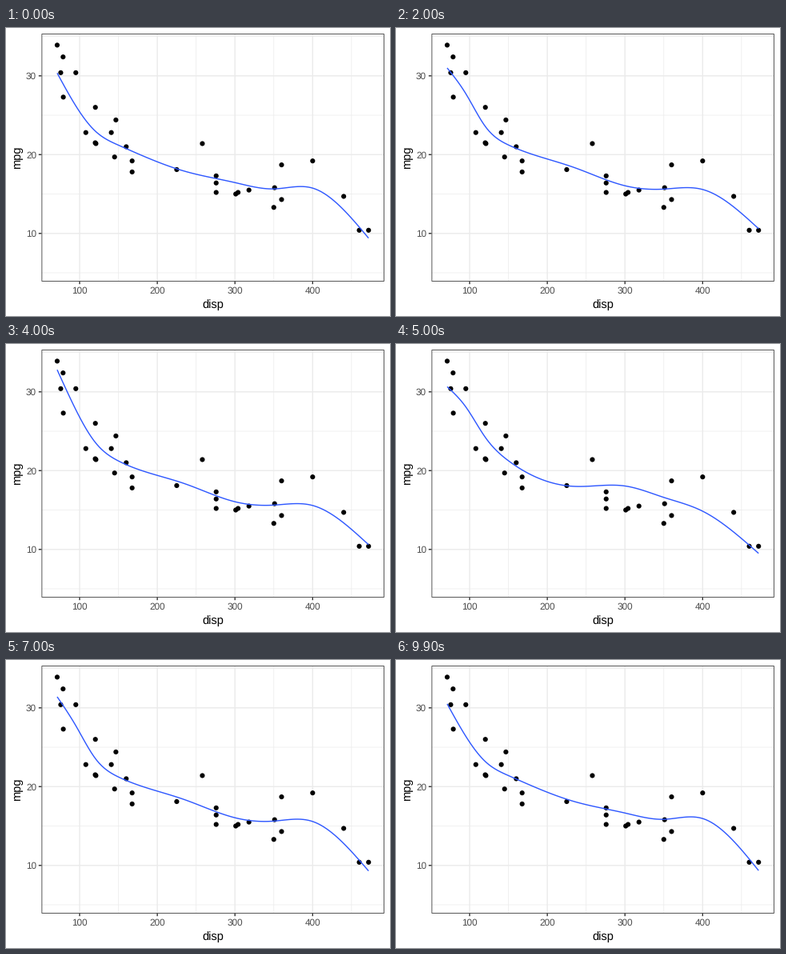
Write a matplotlib script that moves like this. It is 480 px wide and 360 px high and loops after 10000 ms.

```python
import matplotlib.pyplot as plt
import numpy as np
from matplotlib.animation import FuncAnimation
from matplotlib.patches import Circle, Rectangle

W, H, DPI = 480, 360, 96
PT = 72 / DPI  # points per pixel
LEFT, RIGHT, TOP, BOTTOM = 44.5, 472.67, 7.33, 316.5
STEP_MS, CYCLE, HOLD = 100, 10, 6  # frames per curve, last frame at rest

plt.rcParams.update({"path.snap": False, "text.hinting": "none",
                     "font.family": "Liberation Sans"})

cars = [(71.1, 33.9), (75.7, 30.4), (78.7, 32.4), (79, 27.3), (95.1, 30.4),
        (108, 22.8), (120.1, 21.5), (120.3, 26), (121, 21.4), (140.8, 22.8),
        (145, 19.7), (146.7, 24.4), (160, 21), (167.6, 19.2), (167.6, 17.8),
        (225, 18.1), (258, 21.4), (275.8, 17.3), (275.8, 16.4),
        (275.8, 15.2), (301, 15), (304, 15.2), (318, 15.5), (350, 13.3),
        (351, 15.8), (360, 18.7), (360, 14.3), (400, 19.2), (440, 14.7),
        (460, 10.4), (472, 10.4)]

# Each curve is a natural spline through a few key heights
knots = np.array([71.1, 95, 120, 150, 235, 300, 350, 400, 472])
falling = [30.35, 26.2, 23.0, 21.2, 17.9, 16.45, 15.65, 15.75, 9.4]
wavy = [32.95, 27.3, 22.7, 19.65, 21.2, 14.65, 15.25, 16.2, 5.36]
flat = [31.65, 27.4, 22.7, 19.5, 17.8, 15.95, 15.35, 15.4, 10.55]
shelf = [30.65, 28.1, 24.25, 21.25, 18.0, 18.05, 16.6, 14.85, 9.5]
hump = [33.6, 28.6, 24.2, 21.3, 18.7, 15.15, 16.5, 18.85, 8.9]
slope = [30.65, 28.1, 24.5, 22.3, 19.05, 16.15, 15.6, 14.6, 9.0]
typical = np.median([falling, wavy, flat, shelf, hump, slope], axis=0)


def vary(heights, start, end, lift=0):
    """Move both ends of a curve and lift what lies between."""
    return [start, *(np.array(heights[1:-1]) + lift), end]


draws = [falling, wavy, vary(typical, 31, 10.6), flat,
         vary(typical, 32.8, 10.6), shelf, hump, vary(typical, 31.4, 9.3),
         slope, vary(falling, 30.95, 9.2, 0.8)]


def scale(lo, hi, start, end):
    """Map data to pixels with 5 % padding on both sides."""
    pad = 0.05 * (hi - lo)
    return lambda v: start + (v - lo + pad) / (hi - lo + 2 * pad) * (end - start)


px = scale(knots[0], knots[-1], LEFT, RIGHT)
py = scale(np.min(draws), max(y for _, y in cars), BOTTOM, TOP)


def natural_spline(x, y, at):
    y, h, n = np.asarray(y), np.diff(x), len(x)
    a, b = np.eye(n), np.zeros(n)
    for i in range(1, n - 1):
        a[i, i - 1:i + 2] = h[i - 1], 2 * (h[i - 1] + h[i]), h[i]
        b[i] = 6 * ((y[i + 1] - y[i]) / h[i] - (y[i] - y[i - 1]) / h[i - 1])
    m = np.linalg.solve(a, b)
    k = np.clip(np.searchsorted(x, at) - 1, 0, n - 2)
    d, l, r = h[k], x[k + 1] - at, at - x[k]
    return ((m[k] * l**3 + m[k + 1] * r**3) / (6 * d)
            + (y[k] / d - m[k] * d / 6) * l
            + (y[k + 1] / d - m[k + 1] * d / 6) * r)


curve_x = np.linspace(knots[0], knots[-1], 120)
curves = [py(natural_spline(knots, row, curve_x)) for row in draws]

fig = plt.figure(figsize=(W / DPI, H / DPI), dpi=DPI, facecolor="white")
ax = fig.add_axes([0, 0, 1, 1])
ax.set(xlim=(0, W), ylim=(H, 0))
ax.axis("off")


def line(xs, ys, color, width, z):
    return ax.plot(xs, ys, color=color, lw=width * PT, zorder=z,
                   solid_capstyle="butt", solid_joinstyle="round")[0]


def label(x, y, text, size, color, **kw):
    ax.text(x, y, text, fontsize=size, color=color, va="baseline",
            rotation_mode="anchor", **kw)


def grid(xs, ys, width, z):
    for v in xs:
        line([px(v)] * 2, [TOP, BOTTOM], "0.92", width, z)
    for v in ys:
        line([LEFT, RIGHT], [py(v)] * 2, "0.92", width, z)


x_ticks, y_ticks = range(100, 401, 100), range(10, 31, 10)
grid(range(150, 451, 100), range(5, 36, 10), 0.71, 1)
grid(x_ticks, y_ticks, 1.42, 2)

TICK = 3.67
for v in x_ticks:
    line([px(v)] * 2, [BOTTOM, BOTTOM + TICK], "0.2", 1.42, 2)
    label(px(v), 332, str(v), 8.8, "0.3", ha="center")
for v in y_ticks:
    line([LEFT - TICK, LEFT], [py(v)] * 2, "0.2", 1.42, 2)
    label(38, py(v) + 4.2, str(v), 8.8, "0.3", ha="right")
label((LEFT + RIGHT) / 2, 349.7, "disp", 11, "black", ha="center")
label(17.9, (TOP + BOTTOM) / 2, "mpg", 11, "black", ha="center", rotation=90)

for x, y in cars:
    ax.add_patch(Circle((px(x), py(y)), 3.07, color="black", lw=0, zorder=3))
curve = line(px(curve_x), curves[0], "#2F58FF", 1.42, 4)
ax.add_patch(Rectangle((44.85, 7.5), 427.65, 309, fill=False, ec="0.35",
                       lw=PT, zorder=5))


def update(i):
    k, step = divmod(i, CYCLE)
    t = max(0, step - HOLD) / (CYCLE - HOLD)
    nxt = curves[(k + 1) % len(curves)]
    curve.set_ydata((1 - t) * curves[k] + t * nxt)
    return curve,


anim = FuncAnimation(fig, update, frames=CYCLE * len(curves),
                     interval=STEP_MS, repeat=True, repeat_delay=0)
plt.show()
```
